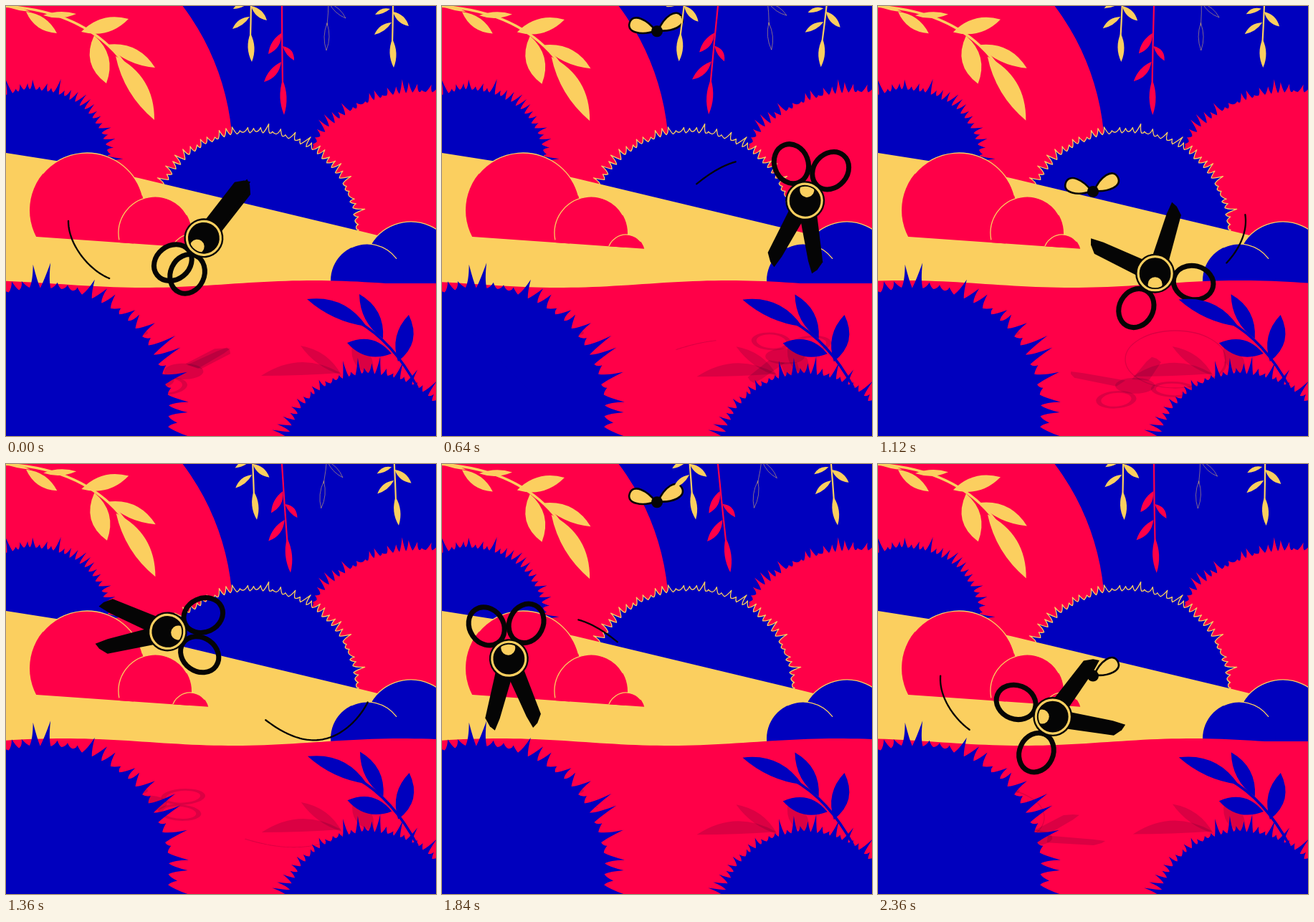
Recreate the animation shown at these times as an HTML page with a canvas. Size 600 by 600 pixels, loop 2400 ms.

```html
<!DOCTYPE html>
<html lang="en">
<head>
<meta charset="utf-8">
<title>Scissors and fly</title>
<style>
html, body { margin: 0; width: 100%; height: 100%; overflow: hidden; background: #0000be; }
canvas { display: block; width: 100vw; height: 100vh; }
</style>
</head>
<body>
<canvas id="stage" width="600" height="600"></canvas>
<script>
const ctx = document.getElementById('stage').getContext('2d');
const BLUE = '#0000be', RED = '#ff0048', YELLOW = '#fbcf5f', BLACK = '#050505';
const SHADE = 'rgba(0,0,40,.14)', THIN = 'rgba(251,207,95,.55)';
const LOOP = 2400, HALF = 1200, STEP = 40, RAD = Math.PI / 180;

// Key poses: [time, value...]. Each half loop flies one lobe of the figure eight.
const PHASE = [[0,-6.5],[320,45],[640,76],[840,97],[1120,156],[1200,173.5]];
const TURN = [[0,-52],[320,48],[640,100],[840,121],[1120,270],[1200,228],[1640,112],[2040,60],[2360,0],[2400,-52]];
const OPEN = [[0,0,0],[160,16,17],[840,17,17],[1120,15,63],[1160,8,52],[1200,0,0]];
const TRIM = [[0,-47,-90],[320,13,-58],[640,31,15],[800,40,40],[840,70,70],[1200,133,90]];

function at(keys, t, k = 1, smooth = false) {
  let i = 0;
  while (i < keys.length - 2 && t >= keys[i + 1][0]) i++;
  const a = keys[i], b = keys[i + 1], d = b[0] - a[0], u = (t - a[0]) / d, c = b[k] - a[k];
  if (!smooth) return a[k] + c * u;
  const p = keys[Math.max(i - 1, 0)], n = keys[Math.min(i + 2, keys.length - 1)];
  const ma = (b[k] - p[k]) / (b[0] - p[0]) * d, mb = (n[k] - a[k]) / (n[0] - a[0]) * d;
  return a[k] + u * (ma + u * (3 * c - 2 * ma - mb + u * (ma + mb - 2 * c)));
}

function figureEight(deg) {
  const a = deg * RAD;
  return [300 + 213 * Math.sin(a), 300 - 82 * (Math.sin(2 * a) + .15 * Math.sin(4 * a))];
}

function sway(t, period) {
  const a = 2 * Math.PI * t / period;
  return .25 * Math.sin(2 * a) - Math.sin(a);
}

function seeded(seed) {
  return () => {
    seed = (seed * 16807) % 2147483647;
    return seed / 2147483647;
  };
}

function stroke(color, width) {
  ctx.strokeStyle = color;
  ctx.lineWidth = width;
  ctx.stroke();
}

function fill(color) {
  ctx.fillStyle = color;
  ctx.fill();
}

function path(points) {
  ctx.beginPath();
  points.forEach(([x, y]) => ctx.lineTo(x, y));
}

function polygon(points, color) {
  path(points);
  ctx.closePath();
  fill(color);
}

function ellipse(x, y, rx, ry = rx) {
  ctx.beginPath();
  ctx.ellipse(x, y, rx, ry, 0, 0, 7);
}

function disc(x, y, r, color) {
  ellipse(x, y, r);
  fill(color);
}

// A disc with a thin light line along part of its edge.
function mound(x, y, r, color, from, to) {
  disc(x, y, r, color);
  ctx.beginPath();
  ctx.arc(x, y, r, from * RAD, to * RAD);
  stroke(YELLOW, 1.3);
}

function around(x, y, turn, draw) {
  ctx.save();
  ctx.translate(x, y);
  ctx.rotate(turn);
  ctx.translate(-x, -y);
  draw();
  ctx.restore();
}

// w1 and w2 are the bulges on either side of the axis.
function leaf(x0, y0, x1, y1, w1, w2 = w1) {
  const d = Math.hypot(x1 - x0, y1 - y0), nx = (y0 - y1) / d, ny = (x1 - x0) / d;
  const mx = (x0 + x1) / 2, my = (y0 + y1) / 2;
  ctx.beginPath();
  ctx.moveTo(x0, y0);
  ctx.quadraticCurveTo(mx + nx * w1, my + ny * w1, x1, y1);
  ctx.quadraticCurveTo(mx - nx * w2, my - ny * w2, x0, y0);
}

function leaves(color, ...list) {
  for (const l of list) { leaf(...l); fill(color); }
}

// A disc whose edge from one angle to another grows curved spikes of random length.
function bush(x, y, r, { from, to, spikes, min, max, seed, color = BLUE, outline }) {
  const random = seeded(seed), step = (to - from) / spikes * RAD;
  const polar = (a, d) => [x + d * Math.cos(a), y + d * Math.sin(a)];
  disc(x, y, r, color);
  ctx.beginPath();
  ctx.moveTo(...polar(from * RAD, r));
  for (let i = 0; i < spikes; i++) {
    const a = from * RAD + step * i, length = min + (max - min) * random() ** 1.4;
    const tip = a + step * (.35 + .5 * random());
    ctx.quadraticCurveTo(...polar(a + step * .35, r + length * .3), ...polar(tip, r + length));
    ctx.quadraticCurveTo(...polar(a + step * .75, r + length * .3), ...polar(a + step, r + 2 * random()));
  }
  fill(color);
  if (outline) stroke(outline, 1.3);
}

function groundLine(t) {
  const dip = 240 - 95 * Math.sin(2 * Math.PI * (t + 200) / LOOP), points = [];
  for (let x = 0; x <= 600; x += 10)
    points.push([x, 388 + 5 * Math.cos(Math.min(Math.abs(x - dip) / 75, 4.5))]);
  return points;
}

function scenery(t) {
  ctx.fillStyle = BLUE;
  ctx.fillRect(0, 0, 600, 600);
  disc(-29.6, 208.4, 346, RED);
  bush(575, 300, 179, { from: -145, to: -75, spikes: 24, min: 3, max: 20, seed: 77, color: RED });
  bush(38, 222, 104, { from: -115, to: 2, spikes: 26, min: 5, max: 24, seed: 1234 });
  bush(346, 318, 141, { from: -155, to: 0, spikes: 42, min: 4, max: 18, seed: 4321, outline: YELLOW });
  polygon([[0,205],[70,216],[185,240],[490,313],[600,340],[600,420],[0,420]], YELLOW);

  ctx.save();
  path([[0,0],[600,0],[600,361],[0,319]]);
  ctx.clip();
  mound(113, 285, 80, RED, 220, 345);
  mound(208, 317, 51, RED, 170, 330);
  mound(257, 345, 26, RED, 190, 320);
  ctx.restore();

  mound(565, 366, 65, BLUE, 205, 310);
  mound(504, 383, 51, BLUE, 245, 323);
  polygon([...groundLine(t), [600,600], [0,600]], RED);
}

function stem(color, width, x0, y0, cx, cy, x1, y1) {
  ctx.beginPath();
  ctx.moveTo(x0, y0);
  ctx.quadraticCurveTo(cx, cy, x1, y1);
  stroke(color, width);
}

function yellowVine(x, y, swing) {
  around(x, y - 40, swing * .1, () => {
    ctx.save();
    ctx.translate(x, y);
    stem(YELLOW, 2.2, -1, -20, -1, 10, -2, 45);
    leaves(YELLOW, [-2,38,0,78,9], [-3,15,-27,32,9,6], [-1,0,21,20,9,9], [-5,-4,-26,4,8,4]);
    ctx.restore();
  });
}

function vines(t) {
  const swing = -sway(t, LOOP);
  yellowVine(343, 0, swing);
  yellowVine(541, 8, swing);
  around(387, 0, swing * .1, () => {
    stem(RED, 2.2, 385, -10, 385, 50, 386, 110);
    leaves(RED, [386,103,388,152,9], [384,38,366,67,8,12], [386,56,402,76,5,11], [384,78,360,106,8,12]);
  });
  around(447, -40, -swing * .12, () => {
    stem(THIN, .9, 450, -10, 450, 10, 448, 27);
    leaf(448, 24, 447, 62, 7);
    stroke(THIN, .9);
    leaf(451, -4, 474, 17, 6);
    stroke(THIN, .9);
  });
}

function branch(nod) {
  around(0, 0, nod * .018, () => {
    stem(YELLOW, 3.5, -5, 0, 110, 6, 165, 80);
    leaves(YELLOW, [-10,-4,34,8,5], [28,8,71,38,16,14], [52,13,98,11,9,8], [105,36,171,18,20,20],
      [123,41,140,108,28,24], [140,54,208,86,14,24], [153,70,207,159,18,32]);
  });
}

function frontPlants(nod) {
  around(575, 530, -nod * .015, () => {
    stem(BLUE, 3.5, 490, 440, 540, 468, 574, 532);
    leaves(BLUE, [420,409,503,447,14,28], [493,402,526,464,18,22], [476,470,538,485,22,24], [562,431,547,496,20,27]);
  });
  bush(50, 570, 176, { from: -110, to: 20, spikes: 27, min: 8, max: 42, seed: 2024 });
  bush(508, 632, 118, { from: -170, to: -30, spikes: 32, min: 6, max: 27, seed: 909 });
}

function leafShadows(nod) {
  ctx.save();
  ctx.translate(-1.5 * nod, 4 * nod);
  leaves(SHADE, [356,516,467,512,2,34], [411,474,468,515,12,17], [483,472,512,514,24,24]);
  ctx.restore();
  ellipse(178, 456, 20, 5);
  fill(SHADE);
}

function scissors(t, color, detailed) {
  const local = t % HALF, [x, y] = figureEight(at(PHASE, local, 1, true));
  ctx.save();
  ctx.translate(t < HALF ? x : 600 - x, y);
  ctx.rotate(at(TURN, t) * RAD);
  for (const side of [1, -1]) {
    ctx.save();
    ctx.scale(1, side);
    ctx.rotate(at(OPEN, local, side > 0 ? 1 : 2) * RAD);
    polygon([[20,-10],[84,-6],[102,-3],[98,5],[88,14],[22,14]], color);
    ctx.rotate(13.5 * RAD);
    ellipse(-55, 0, 28, 23.5);
    stroke(color, 7);
    ctx.restore();
  }
  disc(0, 0, 27.5, color);
  if (detailed) {
    ellipse(0, 0, 23.5);
    stroke(YELLOW, 3.2);
    ellipse(0, 0, 20);
    ctx.clip();
    disc(-15, 0, 10, YELLOW);
  }
  ctx.restore();
}

function trail(t, color, width) {
  const local = t % HALF, head = at(TRIM, local), tail = at(TRIM, local, 2);
  if (head - tail < .5) return;
  const points = [];
  for (let i = 0; i <= 60; i++) {
    const [x, y] = figureEight(tail + (head - tail) * i / 60);
    points.push([t < HALF ? x : 600 - x, y]);
  }
  path(points);
  stroke(color, width);
}

function castShadow(t) {
  ctx.save();
  ctx.transform(1, 0, 0, .404, -28, 379);
  trail(t, SHADE, 2.4);
  scissors(t, SHADE, false);
  ctx.restore();
  if (t % HALF >= 1000) {
    ellipse(t < HALF ? 415 : 162, 493, 70, 40);
    stroke(SHADE, 1.3);
  }
}

function wing(turn) {
  ctx.save();
  ctx.rotate(turn * RAD);
  ctx.beginPath();
  ctx.moveTo(2, 0);
  ctx.bezierCurveTo(18, -13, 40, -16, 40, -1);
  ctx.bezierCurveTo(40, 14, 18, 11, 2, 0);
  fill(YELLOW);
  stroke(BLACK, 2.6);
  ctx.restore();
}

function fly(t) {
  const local = t % HALF;
  ctx.save();
  ctx.translate(300, .466 * local - (t < HALF ? 263 : 245));
  if (local < 1160) wing(t / STEP % 2 ? 228 : 199);
  wing(-29);
  disc(0, 0, 8, BLACK);
  ctx.restore();
}

function draw(t) {
  const nod = sway(t, HALF);
  scenery(t);
  leafShadows(nod);
  castShadow(t);
  fly(t);
  vines(t);
  branch(nod);
  trail(t, BLACK, 2.3);
  scissors(t, BLACK, true);
  frontPlants(nod);
}

function tick() {
  draw(Math.floor(performance.now() % LOOP / STEP) * STEP);
  requestAnimationFrame(tick);
}
ctx.lineCap = 'round';
ctx.lineJoin = 'round';
tick();
</script>
</body>
</html>
```
